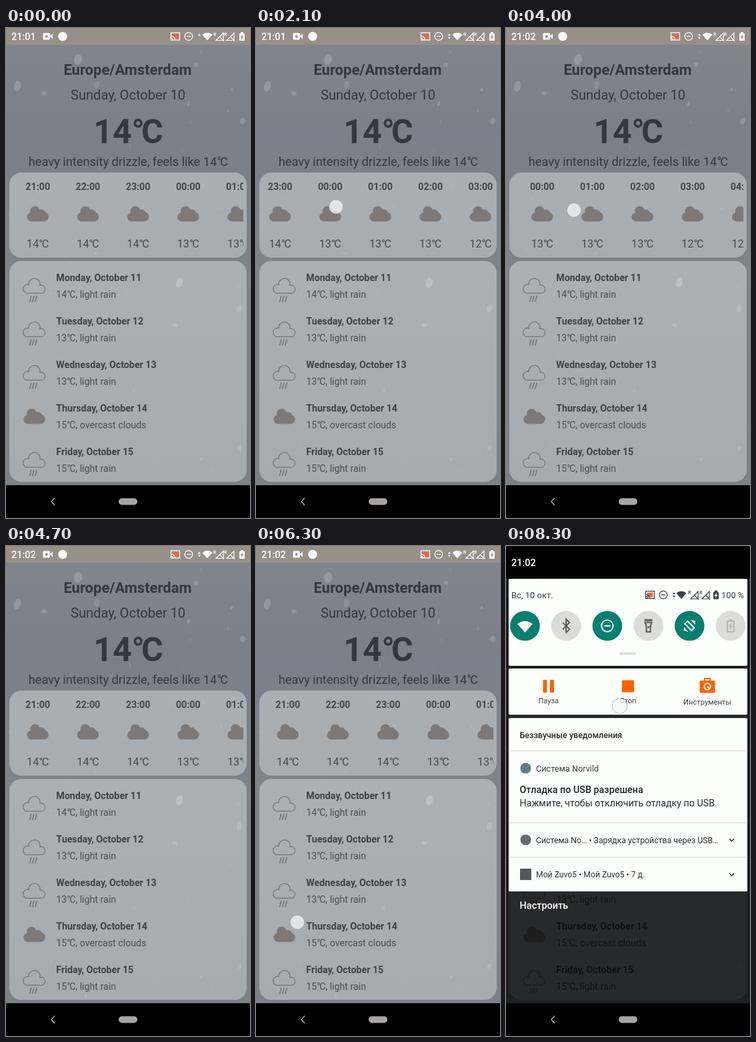
These frames come from a looping animation (366 by 732 pixels, 8.4 s). An HTML page with a canvas:

```html
<!DOCTYPE html>
<html lang="en">
<head>
<meta charset="utf-8">
<title>Weather</title>
<style>
html, body { margin: 0; width: 100%; height: 100%; overflow: hidden; background: #000; }
canvas { display: block; width: 366px; height: 732px; }
</style>
</head>
<body>
<canvas id="stage"></canvas>
<script>
const W = 366, H = 732, LOOP = 8400, STEP = 100;
const canvas = document.getElementById('stage');
const ctx = canvas.getContext('2d');
const dpr = window.devicePixelRatio || 1;
canvas.width = W * dpr;
canvas.height = H * dpr;

const clamp = (v, lo, hi) => Math.min(hi, Math.max(lo, v));

// Linear interpolation through [time, value] pairs.
function track(t, keys) {
  if (t <= keys[0][0]) return keys[0][1];
  for (let i = 1; i < keys.length; i++) {
    const [t0, a] = keys[i - 1], [t1, b] = keys[i];
    if (t <= t1) return a + (b - a) * (t - t0) / (t1 - t0);
  }
  return keys[keys.length - 1][1];
}

// The degree sign is tucked closely against the C that follows it.
function text(s, x, y, size, color, weight = 400, align = 'left') {
  ctx.font = `${weight} ${size}px Roboto, sans-serif`;
  ctx.fillStyle = color;
  ctx.textAlign = 'left';
  const cut = s.indexOf('°') + 1;
  const head = s.slice(0, cut), tail = s.slice(cut);
  const shift = cut ? ctx.measureText(head).width - size * .1 : 0;
  if (align === 'center') x -= (shift + ctx.measureText(tail).width) / 2;
  if (cut) ctx.fillText(head, x, y);
  ctx.fillText(tail, x + shift, y);
}

function box(x, y, w, h, r, color) {
  ctx.fillStyle = color;
  ctx.beginPath();
  ctx.roundRect(x, y, w, h, r);
  ctx.fill();
}

function disc(x, y, r, color) {
  ctx.fillStyle = color;
  ctx.beginPath();
  ctx.arc(x, y, r, 0, 7);
  ctx.fill();
}

function ring(x, y, r, color, width) {
  ctx.strokeStyle = color;
  ctx.lineWidth = width;
  ctx.beginPath();
  ctx.arc(x, y, r, 0, 7);
  ctx.stroke();
}

function line(points, color, width, close) {
  ctx.strokeStyle = color;
  ctx.lineWidth = width;
  ctx.beginPath();
  points.forEach(([x, y]) => ctx.lineTo(x, y));
  if (close) ctx.closePath();
  ctx.stroke();
}

function poly(points, color) {
  ctx.fillStyle = color;
  ctx.beginPath();
  points.forEach(([x, y]) => ctx.lineTo(x, y));
  ctx.fill();
}

function clipped(x, y, w, h, draw) {
  ctx.save();
  ctx.beginPath();
  ctx.rect(x, y, w, h);
  ctx.clip();
  draw();
  ctx.restore();
}

function at(x, y, draw, scale = 1) {
  ctx.save();
  ctx.translate(x, y);
  ctx.scale(scale, scale);
  draw();
  ctx.restore();
}

// Backdrop with drops on the glass
let seed = 11;
const rnd = () => (seed = seed * 16807 % 2147483647) / 2147483647;
const drops = [
  [108, 47, 6, 8, .22], [17, 87, 5, 8, .22], [260, 380, 5, 8, .34],
  [355, 139, 4, 5, .2], [285, 55, 3, 3, .2], [57, 98, 4, 3, .2],
  [136, 85, 4, 6, .14], [350, 419, 4, 6, .22], [350, 628, 3, 4, .2],
  [253, 444, 4, 3, .22], [130, 525, 2, 4, .2], [274, 113, 2, 4, .2]
];
for (let i = 0; i < 50; i++) {
  drops.push([rnd() * W, 28 + rnd() * 650, .6 + rnd() * 1.4, .8 + rnd() * 1.7, .08 + rnd() * .14]);
}

function backdrop() {
  const g = ctx.createLinearGradient(0, 25, 0, 683);
  g.addColorStop(0, '#82858c');
  g.addColorStop(.2, '#7b7f88');
  g.addColorStop(.5, '#7f848a');
  g.addColorStop(1, '#7c8188');
  ctx.fillStyle = g;
  ctx.fillRect(0, 25, W, 658);
  for (const [x, y, rx, ry, a] of drops) {
    ctx.fillStyle = `rgba(222,226,230,${a})`;
    ctx.beginPath();
    ctx.ellipse(x, y, rx, ry, .25, 0, 7);
    ctx.fill();
  }
}

// Weather icons
const cloudLine = new Path2D('M8 23 H26 A6.5 6.5 0 1 0 26 10.5 A9.1 9.1 0 1 0 8 9.5 A7 7 0 1 0 8 23');

function cloud(x, y) {
  const color = '#7d7978';
  at(x, y, () => {
    disc(-4, 7.5, 7.3, color);
    disc(5, 12, 7, color);
    disc(-9.5, 16.3, 6.7, color);
    disc(9.3, 16, 7, color);
    box(-10, 10, 19.5, 13, 0, color);
  });
}

function rain(x, y) {
  at(x - 16, y + 1, () => {
    ctx.strokeStyle = '#747577';
    ctx.lineWidth = 1.3;
    ctx.stroke(cloudLine);
    for (const dx of [12, 16.5, 21]) line([[dx, 27], [dx - 2.5, 37]], '#77777a', 1.8);
  }, .94);
}

// System icons, each centred on its own origin
const wifi = c => {
  ctx.fillStyle = c;
  ctx.beginPath();
  ctx.moveTo(0, 6);
  ctx.arc(0, 6, 11.4, -Math.PI / 2 - .72, -Math.PI / 2 + .72);
  ctx.fill();
};
const camera = (c, ink) => {
  box(-7, -5, 10.5, 10, 1.5, c);
  poly([[3, 0], [7.5, -4], [7.5, 4]], c);
  disc(-1.8, 0, 2, ink);
};
const cast = c => {
  ctx.strokeStyle = c;
  ctx.lineWidth = 1.2;
  ctx.strokeRect(-6.5, -5.5, 13, 11);
  box(-4.5, -3.5, 9, 7, 0, '#f0653e');
  ctx.strokeStyle = c;
  for (const r of [3, 6]) {
    ctx.beginPath();
    ctx.arc(-6.5, 5.5, r, -Math.PI / 2, 0);
    ctx.stroke();
  }
};
const mute = c => {
  ring(0, 0, 5.8, c, 1.3);
  box(-3, -.7, 6, 1.4, 0, c);
};
const signal = c => {
  line([[-5, 6], [6, 6], [6, -5]], c, 1.2, true);
  line([[0, 0], [7, 7]], c, 1.2);
  text('R', -9, -1, 7, c, 500);
};
const battery = (c, ink) => {
  box(-4, -4.5, 8, 11, 1, c);
  box(-2, -6.5, 4, 3, 0, c);
  poly([[1, -3.5], [-2.5, 1.8], [-.3, 1.8], [-1, 5], [2.5, 0], [.4, 0]], ink);
};
const arrows = (c, both) => {
  poly([[-2, -1], [0, -4], [2, -1]], c);
  if (both) poly([[-2, 1], [0, 4], [2, 1]], c);
};

function statusIcons(xs, y, c, ink, both) {
  const list = [cast, mute, k => arrows(k, both), wifi, signal, signal, k => battery(k, ink)];
  list.forEach((icon, i) => at(xs[i], y, () => icon(c)));
}

const clock = t => t < 2900 ? '21:01' : '21:02';

function statusBar(t) {
  const bar = '#969089';
  ctx.fillStyle = bar;
  ctx.fillRect(0, 0, W, 25);
  text(clock(t), 8, 17.5, 14.5, '#fff', 500);
  at(62.5, 12.5, () => camera('#fff', bar));
  disc(85, 12.5, 6.7, '#fff');
  statusIcons([254, 274, 290, 302, 320, 336, 354], 12.5, '#fff', bar, t >= 500);
}

function header() {
  const c = '#34373e';
  text('Europe/Amsterdam', 182.5, 69.5, 22, c, 700, 'center');
  text('Sunday, October 10', 183, 107, 20.1, c, 400, 'center');
  text('14°C', 183.5, 172, 50, c, 700, 'center');
  text('heavy intensity drizzle, feels like 14°C', 183.5, 206, 18.25, c, 400, 'center');
}

function card(y, h) {
  const g = ctx.createLinearGradient(0, y, 0, y + h);
  g.addColorStop(0, 'rgba(219,221,222,.49)');
  g.addColorStop(1, 'rgba(214,217,219,.48)');
  box(5, y, 356, h, 18, g);
}

const hourTemps = [14, 14, 14, 13, 13, 13, 12, 12, 12, 12];

function hourly(scroll) {
  card(216, 127);
  clipped(10, 216, 346, 127, () => hourTemps.forEach((temp, i) => {
    const x = 47.7 + i * 75.2 - scroll;
    const hour = String((21 + i) % 24).padStart(2, '0');
    text(`${hour}:00`, x, 241.5, 14.3, '#434649', 700, 'center');
    cloud(x, 266);
    text(`${temp}°C`, x, 328, 16.2, '#47494c', 400, 'center');
  }));
}

const days = [
  ['Monday', '14°C, light rain'], ['Tuesday', '13°C, light rain'],
  ['Wednesday', '13°C, light rain'], ['Thursday', '15°C, overcast clouds'],
  ['Friday', '15°C, light rain'], ['Saturday', '14°C, moderate rain'],
  ['Sunday', '14°C, light rain']
];

function daily(scroll) {
  card(348, 330);
  clipped(10, 353, 346, 320, () => days.forEach(([day, note], i) => {
    const y = 373 + i * 65 - scroll;
    (note.includes('clouds') ? cloud : rain)(42.5, y + .5);
    text(`${day}, October ${11 + i}`, 75.3, y + 5.3, 14.25, '#3f4245', 700);
    text(note, 75.3, y + 30, 14.2, '#4b4e51');
  }));
}

function navBar() {
  ctx.fillStyle = '#000';
  ctx.fillRect(0, 683, W, 49);
  line([[73, 702], [68, 707.5], [73, 713]], '#a5a5a5', 1.5);
  box(169, 702.5, 28, 10, 5, '#a9a5a5');
}

function touch(x, y) {
  ring(x, y, 10.5, 'rgba(140,144,150,.3)', 1);
  disc(x, y, 10.3, 'rgba(240,242,243,.8)');
}

// Notification shade
const PAPER = '#fdfffd', INK = '#3c4043', ORANGE = '#ff6200';

const tileIcons = [
  c => at(0, 1, () => wifi(c), 1.5),
  c => line([[-5, -5], [5, 5], [0, 10], [0, -10], [5, -5], [-5, 5]], c, 1.9),
  c => at(0, 0, () => mute(c), 1.5),
  c => {
    box(-6, -10, 12, 3, 0, c);
    line([[-5, -5], [5, -5], [3, 0], [3, 9], [-3, 9], [-3, 0]], c, 2, true);
    disc(0, 2, 1.5, c);
  },
  c => {
    line([[-3, -7], [7, 3], [3, 7], [-7, -3]], c, 2, true);
    poly([[2, -9], [9, -7], [8, -2]], c);
    poly([[-2, 9], [-9, 7], [-8, 2]], c);
  },
  c => {
    line([[-5, -7], [5, -7], [5, 9], [-5, 9]], c, 2, true);
    box(-2, -10, 4, 3, 0, c);
    line([[0, -3], [0, 5]], c, 2);
    line([[-3, 1], [3, 1]], c, 2);
  }
];

function quickSettings() {
  box(4, 49, 358, 130, 2, PAPER);
  text('Вс, 10 окт.', 8, 77.5, 13, INK);
  statusIcons([216, 236, 252, 263, 282, 299, 315], 73, INK, PAPER, true);
  text('100 %', 323, 77.5, 12.8, INK);
  tileIcons.forEach((icon, i) => {
    const x = 28.5 + i * 61.7, on = i % 2 === 0 && i < 5;
    disc(x, 119.3, 22.3, on ? '#05806f' : '#dcdddb');
    at(x, 119.3, () => icon(on ? '#fff' : i === 5 ? '#b5b7b5' : '#555957'));
  });
  box(170, 159, 25, 3.5, 1.5, '#dddfdd');
}

function shelf() {
  at(28, 199, () => camera('#5c6162', PAPER));
  disc(51, 199, 7, '#5f7c85');
  disc(73, 199, 1.8, '#4e5354');
}

function controls() {
  box(55.5, 200, 6, 19, 0, ORANGE);
  box(66, 200, 6, 19, 0, ORANGE);
  box(174, 200.5, 18, 18, 1, ORANGE);
  box(290.5, 201, 23, 18.5, 2, ORANGE);
  ctx.strokeStyle = ORANGE;
  ctx.lineWidth = 2;
  ctx.strokeRect(298, 198, 8, 4);
  ring(302, 210, 4.7, PAPER, 2);
  line([[302, 210], [306, 214]], PAPER, 2);
  text('Пауза', 63.7, 234.5, 11, INK, 400, 'center');
  text('Стоп', 183, 234.5, 11, INK, 400, 'center');
  text('Инструменты', 302, 236.5, 11.2, INK, 400, 'center');
}

function notices() {
  box(4, 257, 358, 259, 2, PAPER);
  for (const y of [305.5, 413, 464.5]) box(4, y, 358, 1, 0, '#d5d8d6');
  text('Беззвучные уведомления', 20.5, 286.5, 12.5, '#26282a', 500);
  disc(29.5, 332, 8, '#5f7c89');
  text('Система Norvild', 45, 336.5, 12.7, INK);
  text('Отладка по USB разрешена', 20.5, 369, 14.3, '#202224', 500);
  text('Нажмите, чтобы отключить отладку по USB.', 20.5, 388.5, 14.25, '#2c2f31');
  disc(29.5, 439, 8, '#686c70');
  text('Система No… • Зарядка устройства через USB…', 45, 443.5, 12.3, '#2c2f31');
  box(21, 482, 17, 17, 0, '#55585b');
  text('Мой Zuvo5 • Мой Zuvo5 • 7 д.', 45, 495, 12.2, '#2c2f31');
  for (const y of [439.5, 491]) line([[335, y - 2], [338.5, y + 1.5], [342, y - 2]], '#202224', 1.5);
}

function shade(t) {
  const bottom = track(t, [[7200, 0], [7300, 40], [7600, 215], [7700, 345], [7800, 440], [7900, 495], [8000, 516]]);
  if (!bottom) return;
  const dim = track(t, [[7200, 0], [7600, .365], [8000, .76]]);
  ctx.fillStyle = `rgba(0,0,0,${dim})`;
  ctx.fillRect(0, 0, W, 683);
  ctx.fillStyle = `rgba(0,0,0,${track(t, [[7200, 0], [7600, 1]])})`;
  ctx.fillRect(0, 0, W, 49);
  // Fading touch point, mostly hidden by the panel
  if (t >= 7500 && t < 7700) disc(35, 53, 10, '#222');
  at(0, Math.min(0, bottom - 215), () => {
    text('21:02', 8, 30, 14.5, '#fff', 500);
    quickSettings();
    const edge = Math.max(bottom, 215);
    box(4, 183, 358, Math.min(edge, 252) - 183, 2, PAPER);
    if (edge < 230) shelf();
    else clipped(0, 183, W, edge - 183, () => {
      controls();
      notices();
    });
  });
  ctx.globalAlpha = track(t, [[7800, 0], [8000, 1]]);
  text('Настроить', 20.5, 542, 14.5, '#fff', 500);
  ctx.globalAlpha = 1;
}

// Finger positions for each gesture
const swipeLeft = [[1700, 290], [2100, 120], [2300, 62]];
const swipeRight = [[3600, 60], [4000, 102], [4500, 325]];
const swipeUp = [[5100, 463], [5400, 398], [5700, 330]];
const swipeDown = [[5900, 400], [6300, 562], [6500, 600]];
const pullDown = [[7100, 8], [7400, 53]];

function hourScroll(t) {
  if (t < 2300) return clamp(282 - track(t, swipeLeft), 0, 253);
  if (t < 3600) return 253 - 33 * Math.pow(1 - clamp((t - 2300) / 500, 0, 1), 3);
  return clamp(321 - track(t, swipeRight), 0, 253);
}

function dayScroll(t) {
  if (t < 5900) return clamp(455 - track(t, swipeUp), 0, 125);
  return clamp(533 - track(t, swipeDown), 0, 125);
}

function finger(t) {
  const during = k => t >= k[0][0] && t <= k[k.length - 1][0];
  if (during(swipeLeft)) touch(track(t, swipeLeft), 267);
  if (during(swipeRight)) touch(track(t, swipeRight), 272);
  if (during(swipeUp)) touch(58, track(t, swipeUp));
  if (during(swipeDown)) touch(62, track(t, swipeDown));
  if (during(pullDown)) touch(35, track(t, pullDown));
  if (t >= 8200) {
    disc(170.5, 239, 11.3, 'rgba(246,248,248,.75)');
    ring(170.5, 239, 11.3, 'rgba(150,155,165,.6)', 1);
  }
}

function draw(t) {
  ctx.setTransform(dpr, 0, 0, dpr, 0, 0);
  backdrop();
  statusBar(t);
  header();
  hourly(hourScroll(t));
  daily(dayScroll(t));
  shade(t);
  navBar();
  finger(t);
}

const start = performance.now();
function frame(now) {
  const t = Math.max(0, now - start) % LOOP;
  draw(Math.floor(t / STEP) * STEP);
  requestAnimationFrame(frame);
}
draw(0);
requestAnimationFrame(frame);
</script>
</body>
</html>
```
